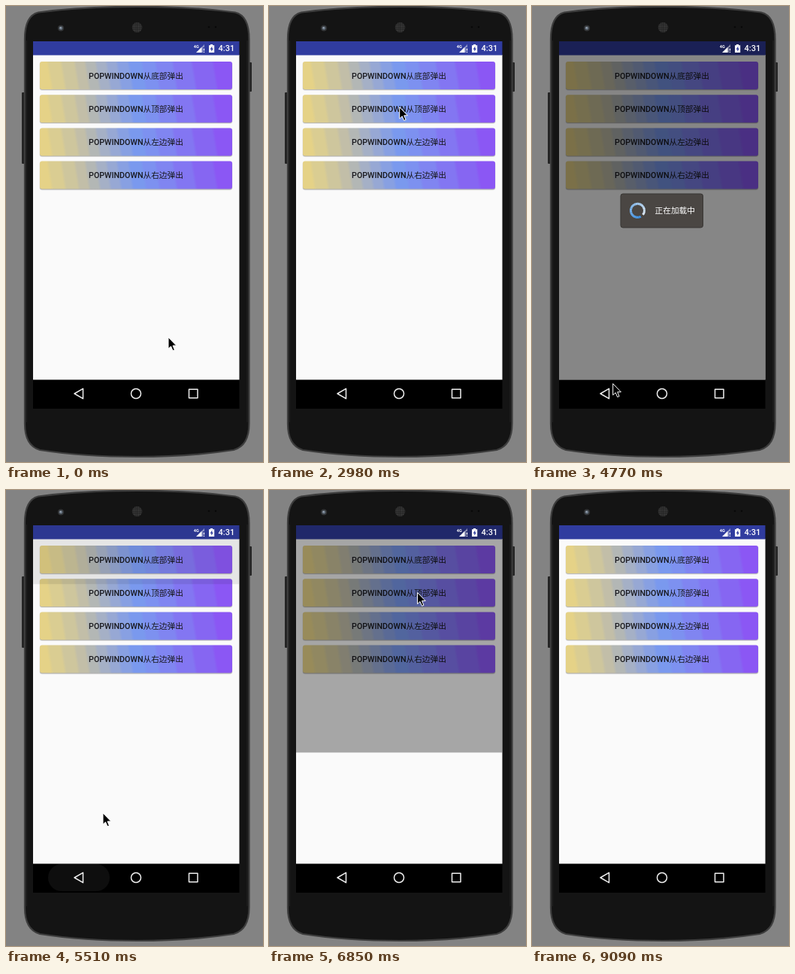
An HTML page that plays this animation: 342 px wide and 607 px high, repeating every 9.62 s.

```html
<!DOCTYPE html>
<html lang="zh">
<head>
<meta charset="utf-8">
<title>Popup window demo</title>
<style>
html, body { margin: 0; width: 100%; height: 100%; overflow: hidden; background: #838383; }
svg { display: block; width: 100%; height: 100%; }
text { font-family: Roboto, "Noto Sans CJK SC", "Noto Sans CJK", sans-serif; }
.btn { font-size: 10.7px; font-weight: 500; fill: #17171c; text-anchor: middle; }
.cjk { font-weight: 400; font-family: "Noto Sans CJK SC", "Noto Sans CJK", sans-serif; }
</style>
</head>
<body>
<svg viewBox="0 0 342 607" xmlns="http://www.w3.org/2000/svg">
  <defs>
    <linearGradient id="band" gradientUnits="userSpaceOnUse" x1="0" y1="18.5" x2="249" y2="-22"></linearGradient>
    <pattern id="grille" width="2.4" height="2.4" patternUnits="userSpaceOnUse">
      <circle cx="1.2" cy="1.2" r=".75" fill="#4a4a4a"/>
    </pattern>
    <clipPath id="screen"><rect x="36" y="47" width="274.5" height="450.5"/></clipPath>
  </defs>

  <rect width="342" height="607" fill="#838383"/>

  <!-- phone body -->
  <rect x="21" y="115" width="4" height="95" rx="1" fill="#252525"/>
  <rect x="323" y="75" width="4" height="39" rx="1" fill="#252525"/>
  <path d="M25 44Q25 13 43 8.500Q100 .8 174 .8T305 8.500Q323.500 13 323.500 44V556Q323.500 585 303 591Q245 600 174 600T45 591Q25 585 25 556Z"
        fill="#141414" stroke="#3d3d3d" stroke-width="2.200"/>
  <path d="M27.500 46V554M321 46V554" stroke="#222" fill="none"/>
  <circle cx="73" cy="29.500" r="4" fill="#343638"/>
  <circle cx="73" cy="29.500" r="2.300" fill="#65717f"/>
  <circle cx="72.500" cy="29" r="1" fill="#a3adb9"/>
  <circle cx="174.500" cy="28.500" r="6.800" fill="#202020"/>
  <circle cx="174.500" cy="28.500" r="6.800" fill="url(#grille)"/>
  <circle cx="270" cy="28" r="1.200" fill="#090909"/>
  <circle cx="279" cy="28" r="1.200" fill="#090909"/>

  <!-- app -->
  <rect x="36" y="47" width="274.500" height="489" fill="#000"/>
  <rect x="36" y="65" width="274.500" height="432.500" fill="#fafafa"/>
  <rect x="36" y="47" width="274.500" height="18.500" fill="#303c9f"/>
  <g id="buttons"></g>

  <!-- popup -->
  <g clip-path="url(#screen)">
    <rect id="dim" x="36" y="47" width="274.500" height="0"/>
    <g id="dialog">
      <rect x="118" y="250" width="109.500" height="45" rx="3" fill="#4a4643" stroke="#383634"/>
      <g id="spinner" fill="none" stroke-width="3"></g>
      <text class="cjk" x="163.500" y="276.300" font-size="10.700" fill="#fff">正在加载中</text>
    </g>
  </g>

  <!-- status icons -->
  <g fill="#fff">
    <text x="249.800" y="55.800" font-size="5.500" font-weight="700">4G</text>
    <path d="M253 62L260.500 54.500V62Z"/>
    <path d="M260.500 54.500L264 51V55H262V62H260.500Z" opacity=".45"/>
    <path d="M262.800 56.500h1.300v3h-1.300zM262.800 60.700h1.300v1.300h-1.300z"/>
    <path d="M270 52.300h2V51h3v1.300h2.200V62H270Z"/>
    <path d="M274.300 53.500L271.600 57.700H273.300V60.800L275.900 56.600H274.300Z" fill="#303c9f"/>
    <text x="282.500" y="60.300" font-size="11" font-weight="500">4:31</text>
  </g>

  <!-- navigation bar -->
  <rect id="ripple" x="56" y="498" width="82" height="36" rx="18" fill="#fff" opacity="0"/>
  <g fill="none" stroke="#eee" stroke-width="1.500" stroke-linejoin="round">
    <path d="M91 516L102.500 509.300V522.700Z"/>
    <circle cx="173" cy="516" r="6.500"/>
    <rect x="243.500" y="510.300" width="11.500" height="11.500"/>
  </g>

  <path id="cursor" d="M0 0V15.200L3.500 12L6 17.800L8.400 16.800L6 11.100H10.700Z"
        stroke="#fff" stroke-width="1" stroke-linejoin="round"/>
</svg>
<script>
const LOOP = 9620, STEP = 149, LAST = 61;
const $ = id => document.getElementById(id);
const clamp = v => Math.max(0, Math.min(1, v));
const ease = v => (1 - Math.cos(Math.PI * clamp(v))) / 2;

// Colour bands of the button background: [start, colour]
const bands = [
  [0, '#e5d287'], [.06, '#dacd92'], [.13, '#cec69d'], [.2, '#c2bea8'], [.255, '#b3b7b5'],
  [.31, '#a5b0c6'], [.365, '#97a8d4'], [.42, '#88a0e2'], [.48, '#7a99ee'], [.55, '#7d91f0'],
  [.62, '#8085f1'], [.71, '#8376f2'], [.81, '#8666f2'], [.92, '#8b57f4']
];
$('band').innerHTML = bands.map(([at, color], i) => {
  const end = i + 1 < bands.length ? bands[i + 1][0] - .015 : 1;
  return `<stop offset="${at}" stop-color="${color}"/><stop offset="${end}" stop-color="${color}"/>`;
}).join('');

$('buttons').innerHTML = [...'底顶左右'].map((side, i) => `
  <g transform="translate(45 ${74 + i * 44.2})">
    <rect x="-.5" y=".3" width="257" height="38.300" rx="3.500" opacity=".1"/>
    <rect y="1" width="256" height="36.800" rx="3" opacity=".22"/>
    <rect width="256" height="37" rx="3" fill="url(#band)"/>
    <text class="btn" x="128" y="22.700">POPWINDOWN<tspan class="cjk">从${side}${side === '左' || side === '右' ? '边' : '部'}弹出</tspan></text>
  </g>`).join('');

// Ring fading from pale to blue, with a small gap
const SEGMENTS = 32;
const polar = deg => {
  const a = deg * Math.PI / 180;
  return `${(140.5 + 9 * Math.cos(a)).toFixed(2)} ${(272.3 + 9 * Math.sin(a)).toFixed(2)}`;
};
$('spinner').innerHTML = Array.from({ length: SEGMENTS }, (_, i) => {
  const f = i / (SEGMENTS - 1), from = 38 - i * 10.5;
  const color = `rgb(${225 - 165 * f},${238 - 90 * f},${250 - 14 * f})`;
  return `<path d="M${polar(from)}A9 9 0 0 0 ${polar(from - 11)}" stroke="${color}"/>`;
}).join('');

// Pointer tip: [step, x, y]
const track = [
  [1, 216, 441], [2, 211, 372], [3, 200, 295], [4, 200, 295], [6, 183, 195], [7, 205, 122],
  [9, 250, 102], [12, 199, 136], [14, 197.5, 135], [19, 197.5, 135], [20, 173.7, 134.7],
  [25, 173.7, 134.7], [30, 116, 470], [32, 107.7, 502.7], [34, 101, 515], [35, 101, 515],
  [37, 129, 430], [42, 197.5, 136.5], [47, 197.5, 136.5], [51, 104, 514], [54, 101.5, 517.5],
  [58, 101.5, 517.5], [59, 99, 560], [60, 97, 592], [61, 97, 630]
];
function pointer(k) {
  const i = track.findIndex(p => p[0] >= k);
  if (i <= 0) return track[0].slice(1);
  const [a, b] = [track[i - 1], track[i]];
  const f = (k - a[0]) / (b[0] - a[0]);
  return [a[1] + (b[1] - a[1]) * f, a[2] + (b[2] - a[2]) * f];
}

// Two popup runs, in steps
const runs = [{ show: 21.95, hide: 35.05, tap: 34 }, { show: 43.95, hide: 58.3, tap: 56 }];
const ENTER = 500 / STEP, LEAVE = 400 / STEP;
const glow = [.06, .12, .09, .055];

function draw(time) {
  const k = Math.min(LAST, Math.floor((time % LOOP + 8) / STEP));
  const run = runs[k < 43 ? 0 : 1];
  const entering = ease((k - run.show) / ENTER);
  const leaving = ease((k - run.hide) / LEAVE);
  const open = entering * (1 - leaving);

  $('dim').setAttribute('height', 451 * open);
  $('dim').setAttribute('opacity', Math.min(.465, .5 * open));

  const visible = entering > .95 && open > 0;
  $('dialog').setAttribute('visibility', visible ? 'visible' : 'hidden');
  $('dialog').setAttribute('opacity', 1 - leaving);
  $('dialog').setAttribute('transform', `translate(0 ${-451 * leaving})`);
  const turn = (k - run.show - 10.05) * STEP * .36;
  $('spinner').setAttribute('transform', `rotate(${turn} 140.5 272.3)`);

  $('ripple').setAttribute('opacity', glow[k - run.tap] || 0);
  $('cursor').setAttribute('transform', `translate(${pointer(k).join(' ')})`);
}

const start = performance.now();
function tick() {
  draw(performance.now() - start);
  requestAnimationFrame(tick);
}
tick();
</script>
</body>
</html>
```
